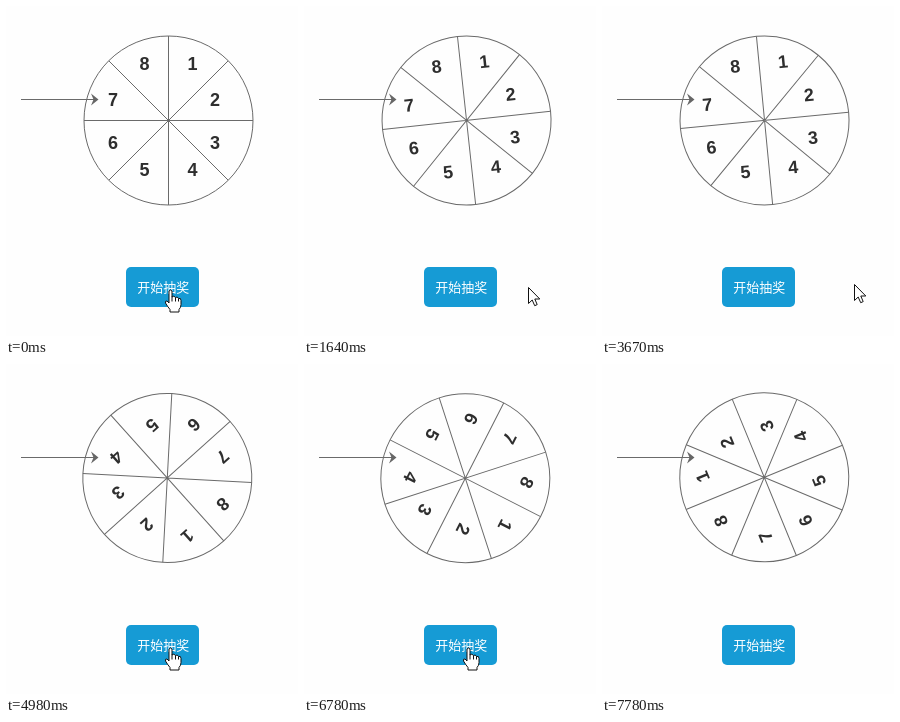
Animation of 292 by 330 pixels, one loop 7910 ms. Source, as an HTML page:

```html
<!DOCTYPE html>
<html lang="zh">
<head>
<meta charset="utf-8">
<style>
  html, body { margin: 0; width: 100%; height: 100%; overflow: hidden; background: #fefefe; }
  svg { display: block; }
  .lines { fill: none; stroke: #6a6a6a; }
  .digits { font: bold 18px "Liberation Sans", Arial, sans-serif; fill: #2e2e2e; text-anchor: middle; }
  .label { font: 13px "Noto Sans CJK SC", "Noto Sans CJK", sans-serif; fill: #fff; text-anchor: middle; }
  .cursor { fill: #fff; stroke: #111; stroke-linejoin: round; }
</style>
</head>
<body>
<svg width="292" height="330" viewBox="0 0 292 330">
  <g id="wheel">
    <g class="lines">
      <circle r="84.5"/>
      <path id="spokes"/>
    </g>
    <g class="digits" id="digits"></g>
  </g>
  <path class="lines" d="M15 93.5H88"/>
  <path fill="#666" d="M85 87.5L92.5 93.5L85 99.5L87.5 93.5Z"/>
  <rect x="120" y="261" width="73" height="40" rx="5" fill="#169bd5"/>
  <text class="label" x="157.3" y="286">开始抽奖</text>
  <g class="cursor" id="cursor">
    <path id="arrow" d="M.5 .5V16.5L4.2 13L6.7 18.7L9.2 17.6L6.8 12H11.8Z"/>
    <path id="hand" d="M-1.5 1.5Q0 -.5 1.5 1.5V7.5Q3.5 5.5 5 8Q7 6.5 8 9Q10.5 8 10.5 11V15Q10.5 18 8.5 20V22.5H-.5V20Q-3 17 -5 13.5Q-5.5 11 -3.5 11.5L-1.5 13.5ZM1.5 7V12M5 8V12M8 9V12"/>
  </g>
</svg>
<script>
const LOOP = 7910, SPIN_TIME = 1000, RADIUS = 84.5;
const CLICK = { x: 164.5, y: 283.5 };
const $ = id => document.getElementById(id);

// Every click turns the wheel, then the pointer drifts off to (x, y)
const spins = [
  { start: 787.4, turn: 1087.5, x: 224, y: 281 },
  { start: 2636, turn: 707, x: 252, y: 278 },
  { start: 4780, turn: 482.5, x: 222, y: 274 },
  { start: 6815, turn: 491, x: 254, y: 345 }
];

// Digits sit in two columns and two rows per side, a little left of and above the hub
function digit(i) {
  const a = (i + .5) * Math.PI / 4;
  const side = Math.sign(Math.sin(a)), row = -Math.sign(Math.cos(a));
  const steep = Math.abs(Math.cos(a)) > Math.abs(Math.sin(a));
  const [x, y] = steep ? [side * 24, row * 53 - 4] : [side * 51 - 4.5, row * 21.5];
  return `<text x="${x}" y="${y + 6.5}">${i + 1}</text>`;
}

function spoke(i) {
  const x = RADIUS * Math.cos(i * Math.PI / 4), y = RADIUS * Math.sin(i * Math.PI / 4);
  return `M${-x} ${-y}L${x} ${y}`;
}

$('digits').innerHTML = Array.from({ length: 8 }, (_, i) => digit(i)).join('');
$('spokes').setAttribute('d', Array.from({ length: 4 }, (_, i) => spoke(i)).join(''));

const clamp = v => Math.min(1, Math.max(0, v));
const smooth = (t, from, to) => {
  const p = clamp((t - from) / (to - from));
  return p * p * (3 - 2 * p);
};

// Same curve as CSS "ease": cubic-bezier(.25, .1, .25, 1)
function ease(p) {
  if (p <= 0 || p >= 1) return clamp(p);
  const bezier = (s, a, b) => 3 * a * s * (1 - s) ** 2 + 3 * b * s * s * (1 - s) + s ** 3;
  let low = 0, high = 1;
  for (let i = 0; i < 24; i++) {
    const mid = (low + high) / 2;
    if (bezier(mid, .25, .25) < p) low = mid; else high = mid;
  }
  return bezier(low, .1, 1);
}

// Away from the button after each click, back just before the next one
function pointerAt(t) {
  let { x, y } = CLICK;
  spins.forEach((spin, i) => {
    const next = spins[i + 1]?.start ?? Infinity;
    const away = smooth(t, spin.start + 340, spin.start + 740)
               - (next < LOOP ? smooth(t, next - 430, next - 140) : 0);
    x += (spin.x - CLICK.x) * away;
    y += (spin.y - CLICK.y) * away;
  });
  return [x, y];
}

function draw(t) {
  const angle = spins.reduce((sum, { start, turn }) => sum + turn * ease((t - start) / SPIN_TIME), 0);
  // The hub lies half a pixel off the turning point
  $('wheel').setAttribute('transform', `translate(162 114) rotate(${angle}) translate(.5 .5)`);

  const [x, y] = pointerAt(t);
  const overButton = x >= 120 && x < 193 && y >= 261 && y < 301;
  $('cursor').setAttribute('transform', `translate(${x} ${y})`);
  $('hand').style.display = overButton ? '' : 'none';
  $('arrow').style.display = overButton ? 'none' : '';
}

const begin = performance.now();
function frame() {
  draw((performance.now() - begin) % LOOP);
  requestAnimationFrame(frame);
}
frame();
</script>
</body>
</html>
```
